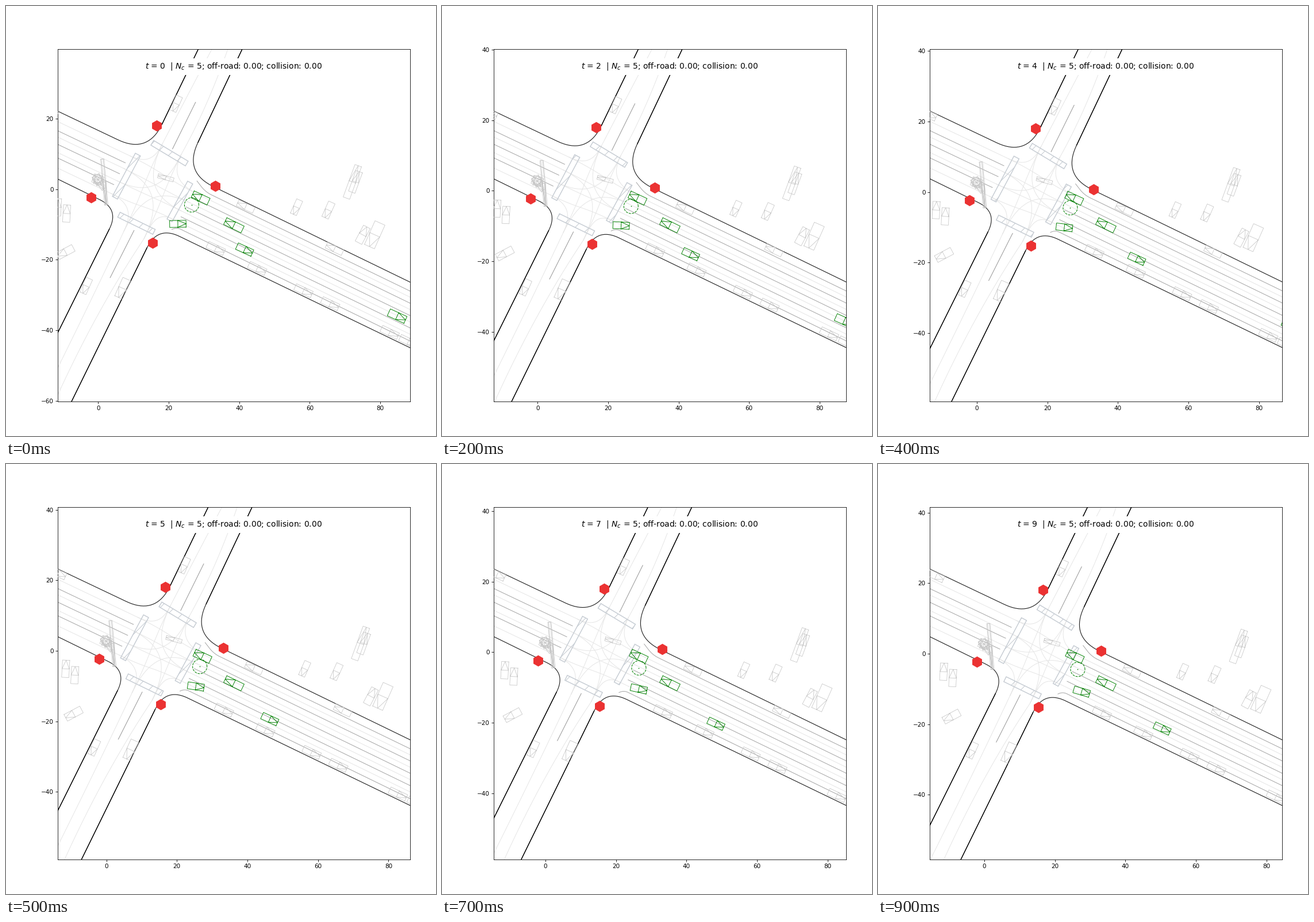
Recreate the animation shown at these times as a matplotlib script. Size 748 by 748 pixels, loop 1000 ms.

```python
import numpy as np
import matplotlib.pyplot as plt
from matplotlib.animation import FuncAnimation
from matplotlib.patches import Polygon
from matplotlib.ticker import MultipleLocator

plt.rcParams["font.family"] = "DejaVu Sans"

STEPS = 10
SCALE = 6.134                       # layout units per metre
ORIGIN = np.array([160.5, 318.7])   # layout position of the world origin
EGO_START = np.array([396.5, 381.5])
WEST_SLOPE, EAST_SLOPE = 0.475, 0.485

EDGE, GRAY, LIGHT, PARKED = "#222222", "#a2a2a2", "#e5e5e5", "#c6c6c6"

fig = plt.figure(figsize=(10, 10), dpi=74.8, facecolor="white")
ax = fig.add_axes([0.12, 0.08, 0.82, 0.82])
ax.xaxis.set_major_locator(MultipleLocator(20))
ax.yaxis.set_major_locator(MultipleLocator(20))


def world(points):
    """Convert layout units (y down) to metres (y up)."""
    return (np.asarray(points, float) - ORIGIN) / SCALE * [1, -1]


def stroke(points, color, width, z):
    ax.plot(*world(points).T, color=color, lw=width, zorder=z,
            solid_capstyle="butt")


def direction(degrees):
    a = np.radians(degrees)
    return np.array([np.cos(a), np.sin(a)])


def bezier(p, c, d, q):
    s = np.linspace(0, 1, 20)[:, None]
    return ((1 - s) ** 3 * p + 3 * s * (1 - s) ** 2 * c
            + 3 * s * s * (1 - s) * d + s ** 3 * q)


def bend(p, c, q):
    """Quadratic curve from p to q pulled towards c."""
    p, c, q = np.array([p, c, q], float)
    return bezier(p, (p + 2 * c) / 3, (q + 2 * c) / 3, q)


def rounded(start, vertex, end, trim):
    """Two straight arms joined by a curve that cuts the vertex."""
    start, vertex, end = np.array([start, vertex, end], float)
    a, b = (vertex + trim * (p - vertex) / np.hypot(*(p - vertex))
            for p in (start, end))
    return np.vstack([start, bend(a, vertex, b), end])


def half_axes(length, width, heading):
    return (direction(heading) * length / 2,
            direction(heading + 90) * width / 2)


def car_outline(x, y, length, width, heading):
    """Rectangle plus a triangle from the middle to the front."""
    ahead, side = half_axes(length, width, heading)
    gap = [np.nan, np.nan]
    shape = [ahead + side, ahead - side, -ahead - side, -ahead + side,
             ahead + side, gap, side, ahead, -side, side]
    return world(np.array(shape) + [x, y])


def park(*spec):
    ax.plot(*car_outline(*spec).T, color=PARKED, lw=0.75, zorder=5)


# Lanes of the west and east roads
lanes = {"W": [], "E": [], "N": [(272, 240), (305, 258)],
         "S": [(205, 392), (240, 405)]}


def west_lane(end_x, y_at_90, color, z):
    y = y_at_90 + WEST_SLOPE * (end_x - 90)
    stroke([(40, y_at_90 - WEST_SLOPE * 50), (end_x, y)], color, 0.93, z)
    return end_x, y


def east_lane(start_x, y_at_703, color, z):
    y = y_at_703 - EAST_SLOPE * (703 - start_x)
    stroke([(start_x, y), (730, y_at_703 + EAST_SLOPE * 27)], color, 0.93, z)
    return start_x, y


for k in range(4):
    lanes["W"].append(west_lane(215 - 11 * k, 201 + 27 * k, LIGHT, 1))
    lanes["E"].append(east_lane(335 - 15 * k, 506.5 + 21.5 * k, LIGHT, 1))
for k in range(3):
    west_lane(208 - 10 * k, 217 + 23.7 * k, GRAY, 2)
    east_lane(322 - 9 * k, 517 + 21.5 * k, GRAY, 2)
stroke(rounded((332, 304), (347, 323.5), (730, 509), 12), GRAY, 0.93, 2)
stroke(rounded((288, 389), (297, 385), (730, 596), 8), GRAY, 0.93, 2)

# Lanes of the north and south roads
n, s = lanes["N"], lanes["S"]
for path in [((374, 45), (316, 155), n[0]), ((396, 45), (357, 165), n[1]),
             ((60, 690), (140, 530), s[0]), ((84, 690), (154, 534), s[1])]:
    stroke(bend(*path), LIGHT, 0.93, 1)
stroke([(330, 167), (289.5, 249)], GRAY, 1.1, 2)
stroke([(223, 390), (181, 473)], GRAY, 1.1, 2)

# Paths across the junction
inward = {"W": direction(26), "E": direction(206),
          "N": direction(116), "S": direction(-64)}


def connect(a, i, b, j):
    p, q = np.array(lanes[a][int(i)]), np.array(lanes[b][int(j)])
    reach = 0.5 * np.hypot(*(q - p))
    stroke(bezier(p, p + reach * inward[a], q + reach * inward[b], q),
           LIGHT, 0.93, 1)


for link in ("W2E2 W3E3 E0W0 E1W1 N0S0 S1N1 N0W0 N0E2 "
             "S1E3 S1W1 E0N1 E1S0 W3S0 W2N1").split():
    connect(*link)

# Road edges, each from its north-south arm round the corner
for corner in [((350, 43), (246.5, 257.3), (40, 159.2), 57),
               ((426, 43.3), (309.4, 289.2), (730, 493.5), 57),
               ((40, 669), (197, 353.5), (40, 276.5), 38),
               ((104, 708.5), (264, 382.5), (730, 607.6), 42)]:
    edge = rounded(*corner)
    stroke(edge, EDGE, 1.1, 3)
    stroke(edge[:2], "black", 1.25, 3)

# Crosswalks: centre, length, width, angle
for x, y, length, width, angle in [(209.5, 296, 85, 10, -62),
                                   (284.5, 256, 70, 9.5, 31),
                                   (302.5, 340, 75, 10, -61.4),
                                   (227, 378, 68, 9.5, 26)]:
    u, v = half_axes(length, width, angle)
    corners = np.array([u + v, u - v, -u - v, v - u]) + [x, y]
    ax.add_patch(Polygon(world(corners), fill=False, hatch="/", lw=1.4,
                         edgecolor="#c6ccd3", zorder=4))

# Vehicles parked along the kerbs of the east road
for x in (365, 437, 517.5, 564, 667.5, 700):
    park(x, 421.7 + 0.483 * (x - 365), 32, 12, 25)
for x in (417, 571.5):
    park(x, 349 + 0.475 * (x - 417), 31, 11, -155)
park(76.5, 183.7, 28, 12, 25)

# Other parked vehicles, grouped by heading: x, y, length
groups = {114: [(296, 170, 28), (139.5, 487, 28), (203, 491, 35),
                (505.5, 350, 27), (561, 355, 29), (641.5, 398, 45)],
          -62: [(620.5, 398, 31)],
          -87: [(105.5, 361, 30), (89.7, 350, 30)],
          152: [(103.5, 428, 31)]}
for heading, spots in groups.items():
    for x, y, length in spots:
        park(x, y, length, 0.42 * length, heading)
park(602.5, 306, 60, 12, -70)
park(608, 306, 38, 12, -70)
park(278, 299, 28, 7, -165)

# Bicycles and poles crowded together on the west road
for k in range(4):
    park(160, 302, 18 - k, 15 - k, 20 + 40 * k)
park(161, 308, 28, 6, 52)
for width in (6, 3):
    park(171, 306, 80, width, 85)

# Goal circle and stop markers
angle = np.linspace(0, 2 * np.pi, 80)
goal = world([(323, 346)])[0]
ax.plot(goal[0] + 2.04 * np.cos(angle), goal[1] + 2.04 * np.sin(angle),
        color="green", lw=1, ls="--", zorder=6)
ax.plot(*goal, "o", color="green", ms=1.6, mew=0, zorder=6)
stops = world([(262.5, 208), (364, 313.5), (148, 333), (255, 412)])
ax.plot(*stops.T, "h", color="#eb3232", ms=18.8, mew=0, zorder=7)


def ego_shift(t):
    return -SCALE * np.array([0.485 * t - 0.0045 * t * t, 0.205 * t])


def moving_cars(t):
    ego = EGO_START + ego_shift(t)
    along = 2.05 * t + 0.026 * t * t
    return [
        (338.5 - along, 334 - 0.52 * along, 30.5, 13, -155),
        (*ego, 33.5, 13, -154),
        (299 + 3.42 * t, 379 + 0.07 * t * t, 28.5, 12, -1 + 1.9 * t),
        (415.2 + 5.7 * t + 0.04 * t * t, 423.7 + 2.7 * t + 0.01 * t * t,
         29.5, 12, 24.5),
        (680.5 + 6.6 * t, 539.5 + 2.85 * t, 31.8, 13, 24.5),
    ]


cars = [ax.plot([], [], color="green", lw=0.9, zorder=8)[0] for _ in range(5)]
title = ax.text(0.5, 0.95, "", transform=ax.transAxes, fontsize=13.4,
                ha="center", va="center", zorder=10,
                bbox=dict(boxstyle="square,pad=0.4", fc="white", ec="none"))


def update(t):
    cx, cy = world([EGO_START + ego_shift(t)])[0]
    ax.set_xlim(cx - 50, cx + 50)
    ax.set_ylim(cy - 50, cy + 50)
    for line, spec in zip(cars, moving_cars(t)):
        line.set_data(*car_outline(*spec).T)
    title.set_text(rf"$t$ = {t}  | $N_c$ = 5; off-road: 0.00; collision: 0.00")
    return [*cars, title]


anim = FuncAnimation(fig, update, frames=STEPS, interval=100, repeat=True,
                     repeat_delay=0, blit=False)
plt.show()
```
